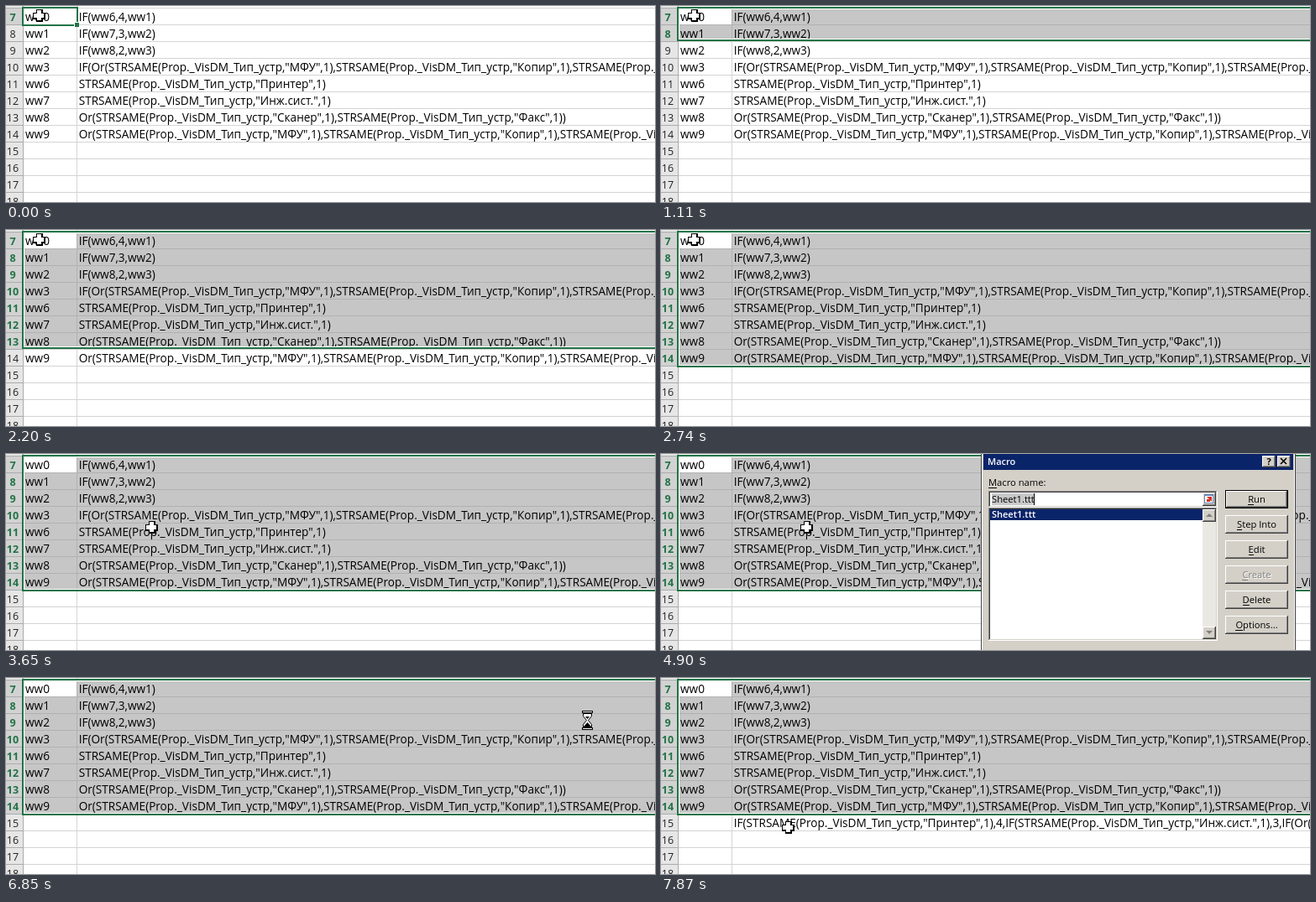
These frames come from a looping animation (773x234 px, 7.99 s). An HTML page with a canvas:

```html
<!DOCTYPE html>
<html lang="ru">
<head>
<meta charset="utf-8">
<style>
html, body { margin: 0; width: 100%; height: 100%; overflow: hidden; background: #fff; }
canvas { display: block; }
</style>
</head>
<body>
<canvas id="stage" width="773" height="234"></canvas>
<script>
const ctx = document.getElementById('stage').getContext('2d');
const W = 773, H = 234, LOOP = 7990, ROW = 20;
const GREEN = '#217346', NAVY = '#0a246a', FACE = '#d4d0c8';
const FAMILY = '"Open Sans", "Noto Sans", sans-serif';
const CELL_FONT = '13.6px ' + FAMILY;
const UI_FONT = '11.2px ' + FAMILY;
const UI_BOLD = '600 11px ' + FAMILY;

const same = kind => `STRSAME(Prop._VisDM_Тип_устр,"${kind}",1)`;
const anyOf = (...kinds) => `Or(${kinds.map(same).join(',')})`;
const copiers = anyOf('МФУ', 'Копир', 'Плоттер');
const cells = [
  ['ww0', 'IF(ww6,4,ww1)'],
  ['ww1', 'IF(ww7,3,ww2)'],
  ['ww2', 'IF(ww8,2,ww3)'],
  ['ww3', `IF(${copiers},1,0)`],
  ['ww6', same('Принтер')],
  ['ww7', same('Инж.сист.')],
  ['ww8', anyOf('Сканер', 'Факс')],
  ['ww9', copiers]
];
const result = `IF(${same('Принтер')},4,IF(${same('Инж.сист.')},3,IF(${anyOf('Сканер', 'Факс')},2,0)))`;

// [time, selected rows, y of the lower selection edge]
const selection = [
  [0, 0, 22], [430, 1, 22], [1110, 2, 40], [1270, 2, 42], [1420, 3, 60],
  [1540, 3, 62], [1660, 4, 80], [1780, 5, 100], [1940, 6, 114], [2080, 6, 122],
  [2200, 7, 140], [2320, 7, 142], [2440, 8, 161], [2590, 8, 162]
];
// [time, pointer shape, x, y]
const pointer = [
  [0, 'cross', 39, 11], [3050, 'cross', 20, 36], [3200, 'cross', 24, 7],
  [3350, 'cross', 145, 40], [3500, 'cross', 172, 85], [3650, 'cross', 173, 87],
  [5490, 'cross', 177, 87], [5630, 'cross', 262, 115], [5750, 'arrow', 400, 160],
  [5870, 'arrow', 545, 190], [5990, 'arrow', 632, 194], [6150, 'arrow', 672, 115],
  [6280, 'arrow', 691, 50], [6420, 'arrow', 694, 50], [6850, 'hourglass', 692, 50],
  [6970, 'cross', 692, 50], [7090, 'cross', 590, 78], [7210, 'cross', 473, 113],
  [7360, 'cross', 395, 150], [7480, 'cross', 305, 177], [7600, 'cross', 231, 187],
  [7750, 'cross', 172, 182], [7870, 'cross', 151, 178]
];
const stepAt = (steps, t) => steps.filter(s => s[0] <= t).pop();

function rect(color, x, y, w, h) {
  ctx.fillStyle = color;
  ctx.fillRect(x, y, w, h);
}

function text(s, x, y, font, color = '#000', align = 'left') {
  ctx.font = font;
  ctx.fillStyle = color;
  ctx.textAlign = align;
  ctx.fillText(s, x, y);
}

function shape(points, fill, stroke) {
  ctx.beginPath();
  points.forEach(([x, y]) => ctx.lineTo(x, y));
  ctx.closePath();
  if (fill) { ctx.fillStyle = fill; ctx.fill(); }
  if (stroke) { ctx.strokeStyle = stroke; ctx.lineWidth = 1; ctx.stroke(); }
}

function sheet(t) {
  const [, count, edge] = stepAt(selection, t);
  const headers = Math.max(count, 1);
  rect('#fff', 0, 0, W, H);
  rect('#e6e6e6', 0, 0, 20, H);
  rect('#d2d2d2', 0, 3, 20, headers * ROW);
  if (count) {
    rect('#c6c6c6', 21, 3, W, edge - 3);
    rect('#fff', 21, 3, 63, 19);
  }
  for (let y = 2; y < H; y += ROW) {
    rect('#d4d4d4', 21, y, W, 1);
    rect('#ababab', 0, y, 20, 1);
    if (count && y < edge) rect('#b1b1b1', 21, y, W, 1);
  }
  rect('#d4d4d4', 84, 0, 1, H);
  if (count) rect('#b1b1b1', 84, 3, 1, edge - 3);
  rect('#ababab', 20, 0, 1, H);

  for (let i = 0; i < 12; i++) {
    const y = 18 + i * ROW, on = i < headers;
    text(i + 7, 8, y, (on ? '700 ' : '') + '12.5px ' + FAMILY, on ? GREEN : '#222', 'center');
    if (cells[i]) {
      text(cells[i][0], 23, y, CELL_FONT);
      text(cells[i][1], 86.7, y, CELL_FONT);
    }
  }
  if (t >= 6970) text(result, 86.7, 178, CELL_FONT);

  // Two-pixel border with a white line along its inner side
  const right = count ? W : 86;
  rect('#fff', 21, 3, right - 21, 1);
  rect('#fff', 21, 3, 1, edge - 3);
  rect('#fff', 21, edge - 1, right - 21, 1);
  rect(GREEN, 19, 1, right - 19, 2);
  rect(GREEN, 19, 1, 2, edge + 1);
  rect(GREEN, 19, edge, right - 19, 2);
  if (!count) {
    rect(GREEN, 84, 1, 2, 21);
    rect('#fff', 81, 19, 6, 6);
    rect(GREEN, 82, 20, 5, 5);
  }
}

function bevel(x, y, w, h, sunken) {
  const [light, dark] = sunken ? ['#808080', '#fff'] : ['#fff', '#404040'];
  rect(dark, x, y, w, h);
  rect(light, x, y, w - 1, h - 1);
  rect(sunken ? FACE : '#808080', x + 1, y + 1, w - 2, h - 2);
  rect(sunken ? '#404040' : FACE, x + 1, y + 1, w - 3, h - 3);
  rect(FACE, x + 2, y + 2, w - 4, h - 4);
}

function underline(letter, x, y, color = '#000') {
  ctx.font = UI_FONT;
  rect(color, Math.round(x), y, Math.round(ctx.measureText(letter).width), 1);
}

function button(label, y, { main, disabled, pressed } = {}) {
  if (main) rect('#000', 672, y, 75, 22);
  if (main) bevel(673, y + 1, 73, 20, pressed);
  else bevel(672, y, 75, 22);
  const d = pressed ? 1 : 0, color = disabled ? '#808080' : '#000';
  if (disabled) text(label, 710.5, y + 16, UI_FONT, '#fff', 'center');
  text(label, 709.5 + d, y + 15 + d, UI_FONT, color, 'center');
  underline(label[0], 709.5 + d - ctx.measureText(label).width / 2, y + 17 + d, color);
}

function dialog(t) {
  const pressed = t >= 6710;
  const caret = !pressed && (t < 5360 || (t >= 5870 && t < 6420));
  rect('#404040', 381, 0, 375, H);
  rect('#fff', 382, 0, 373, H);
  rect(FACE, 383, 0, 371, H);
  rect(NAVY, 384, 0, 369, 19);
  text('Macro', 389, 13, UI_BOLD, '#fff');
  bevel(716, 2, 16, 14);
  bevel(734, 2, 16, 14);
  text('?', 724, 13, '700 11px ' + FAMILY, '#000', 'center');
  ctx.strokeStyle = '#000';
  ctx.lineWidth = 1.6;
  ctx.beginPath();
  ctx.moveTo(738, 5); ctx.lineTo(745, 12);
  ctx.moveTo(745, 5); ctx.lineTo(738, 12);
  ctx.stroke();

  text('Macro name:', 390, 38, UI_FONT);
  underline('M', 390, 40);

  bevel(390, 44, 273, 20, true);
  rect('#fff', 392, 46, 269, 16);
  if (!pressed) rect('#c8c8c8', 394, 47, 50, 14);
  text('Sheet1.ttt', 394, 58, UI_FONT);
  if (caret) rect('#000', 444, 47, 1, 14);
  bevel(645, 46, 16, 16);
  rect('#6b86b8', 647, 48, 11, 11);
  rect('#fff', 648, 50, 9, 8);
  shape([[650, 51], [656, 51], [656, 57]], '#d03020');
  rect('#d03020', 650, 54, 4, 3);

  bevel(390, 64, 273, 159, true);
  rect('#fff', 392, 66, 269, 155);
  rect(NAVY, 392, 66, 253, 13);
  text('Sheet1.ttt', 394, 76, UI_BOLD, '#fff');
  rect('#eae8e3', 645, 66, 16, 155);
  bevel(645, 66, 16, 15);
  bevel(645, 206, 16, 15);
  shape([[649, 75], [653, 71], [657, 75]], '#808080');
  shape([[649, 211], [657, 211], [653, 215]], '#808080');

  button('Run', 43, { main: true, pressed });
  button('Step Into', 73);
  button('Edit', 103);
  button('Create', 133, { disabled: true });
  button('Delete', 163);
  button('Options...', 193);
}

const draw = {
  cross(x, y) {
    rect('#000', x - 7, y - 3, 15, 8);
    rect('#000', x - 3, y - 7, 8, 15);
    rect('#fff', x - 6, y - 2, 12, 5);
    rect('#fff', x - 2, y - 6, 5, 12);
  },
  arrow(x, y) {
    const outline = [[0, 0], [0, 16], [4, 13], [7, 20], [9, 19], [6, 12], [11, 12]];
    shape(outline.map(([a, b]) => [x + a + .5, y + b + .5]), '#fff', '#000');
  },
  hourglass(x, y) {
    const glass = [[-5, -8], [5, -8], [5, -5], [1, 0], [5, 5], [5, 8], [-5, 8], [-5, 5], [-1, 0], [-5, -5]];
    shape(glass.map(([a, b]) => [x + a + .5, y + b + .5]), '#fff', '#000');
    for (const dy of [-11, 9]) {
      rect('#000', x - 6, y + dy, 13, 3);
      rect('#fff', x - 5, y + dy + 1, 11, 1);
    }
    shape([[x - 2, y - 4], [x + 3, y - 4], [x + .5, y - 1]], '#000');
    shape([[x - 4, y + 8], [x + .5, y + 3], [x + 5, y + 8]], '#000');
  }
};

function frame(now) {
  const t = now % LOOP;
  sheet(t);
  if (t >= 4900 && t < 6850) dialog(t);
  const [, kind, x, y] = stepAt(pointer, t);
  draw[kind](x, y);
  requestAnimationFrame(frame);
}
requestAnimationFrame(frame);
</script>
</body>
</html>
```
